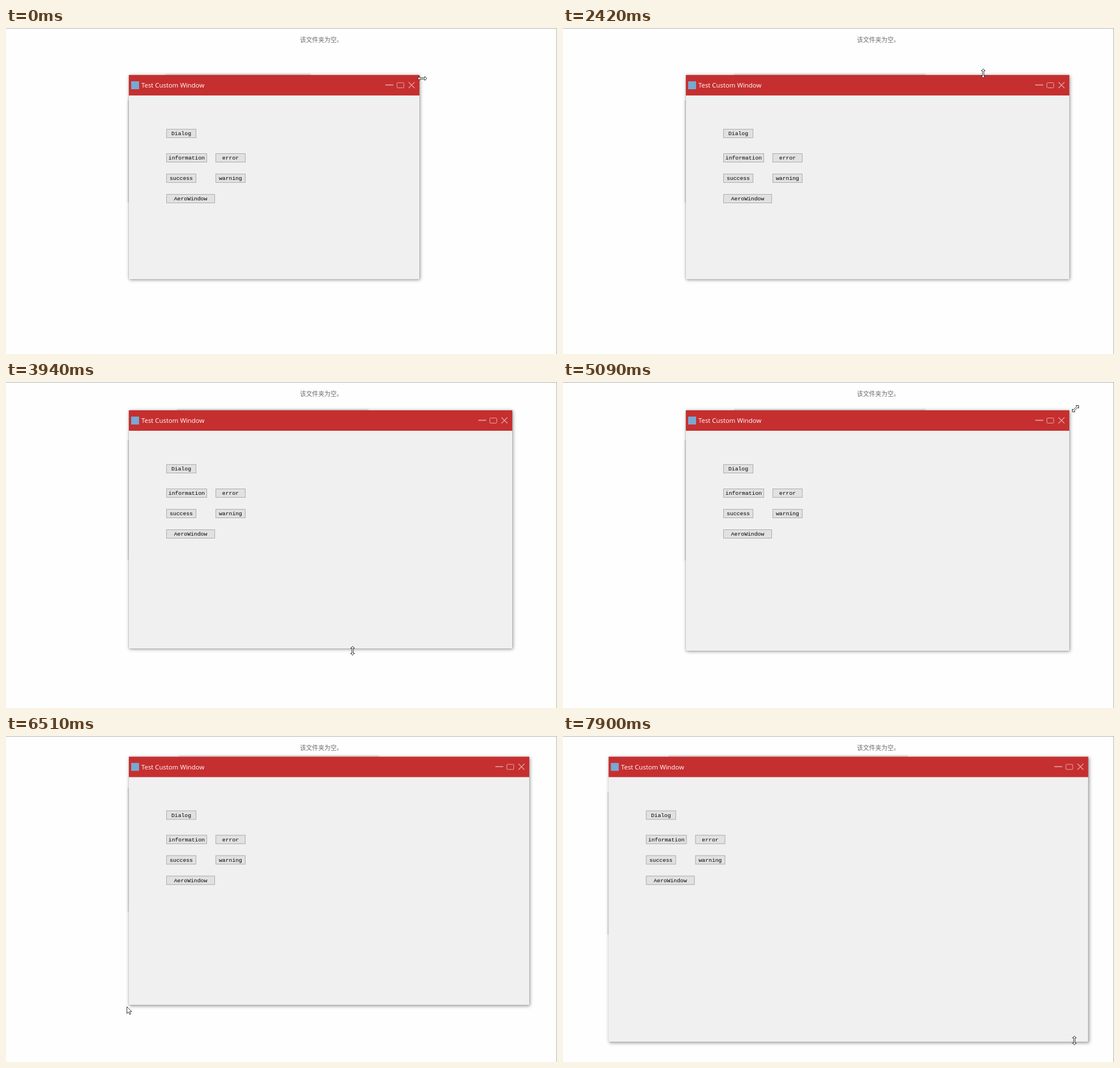
Write an HTML page that moves like this. It is 973x575 px and loops after 8 s.

```html
<!DOCTYPE html>
<html lang="zh-CN">
<head>
<meta charset="utf-8">
<title>Custom window</title>
<style>
html, body { margin: 0; width: 100%; height: 100%; overflow: hidden; background: #fefefe; }
body { position: relative; }
body * { position: absolute; box-sizing: border-box; white-space: nowrap; }
#desk { inset: 0; border: solid #b4b4b4; border-width: 1px 1px 0 0; }
#empty { left: 519px; top: 10px; font: 10.8px/20px "Noto Sans CJK SC", "Noto Sans CJK", sans-serif; color: #6d6d6d; }
#win { left: 0; top: 0; background: #f0f0f0; box-shadow: 0 0 1px #888, 1px 1px 6px rgba(0, 0, 0, .45); }
#bar { left: 0; right: 0; top: 0; height: 36px; background: #c62f2f; }
#icon { left: 4px; top: 11px; width: 14px; height: 14px; background: #78a9d2; }
#title { left: 22px; top: 0; font: 11.4px/36px "Open Sans", "Noto Sans", sans-serif; color: #fff; }
#controls { right: 0; top: 0; }
#topStrip { left: 12.5%; width: 50%; top: -4px; height: 4px; background: linear-gradient(#0000, #0002); }
#leftStrip { top: 12.5%; height: 50%; left: -4px; width: 4px; background: linear-gradient(90deg, #0000, #0002); }
.button { height: 16px; border: 1px solid #adadad; background: #e1e1e1; color: #000; text-align: center;
  font: 9.75px/15px "Liberation Mono", monospace; }
#pointer { left: 0; top: 0; overflow: visible; }
</style>
</head>
<body>
<div id="desk"></div>
<div id="empty">该文件夹为空。</div>
<div id="win">
  <div id="topStrip"></div>
  <div id="leftStrip"></div>
  <div id="bar">
    <div id="icon"></div>
    <div id="title">Test Custom Window</div>
    <svg id="controls" width="64" height="36" fill="none" stroke="#dfaaaa">
      <path d="M4 17.5H18" stroke-width="1.6"/>
      <rect x="24.5" y="13.5" width="12" height="9" rx="1"/>
      <path d="M45 12.5L55.5 23M55.5 12.5L45 23" stroke-width="1.2"/>
    </svg>
  </div>
  <div class="button" style="left:66px;top:95px;width:53px">Dialog</div>
  <div class="button" style="left:66px;top:138px;width:72px">information</div>
  <div class="button" style="left:153px;top:138px;width:53px">error</div>
  <div class="button" style="left:66px;top:174px;width:53px">success</div>
  <div class="button" style="left:153px;top:174px;width:53px">warning</div>
  <div class="button" style="left:66px;top:210px;width:86px">AeroWindow</div>
</div>
<svg id="pointer" width="1" height="1"><path fill="#fff" stroke="#222" stroke-width=".9"/></svg>
<script>
const LOOP = 8000;
const TICK = 140; // the screen refreshes in steps of this length
const win = document.getElementById('win');
const pointer = document.querySelector('#pointer path');

const ARROW = 'M.5 .5V12.5L3.3 9.8 5.3 14.2 7.2 13.4 5.3 9.1H9Z';
const DOUBLE = 'M-8 0L-4.5 -3.5V-1.2H4.5V-3.5L8 0 4.5 3.5V1.2H-4.5V3.5Z';
const ANGLES = { we: 0, ns: 90, ne: -45 };

// The pointer glides to each grip by `arrive`, then drags edges from `start` to `end`
const drags = [
  { arrive: 0, start: 410, end: 830, shape: 'we', grip: [735, 89], by: { right: 106 } },
  { arrive: 1520, start: 1650, end: 2000, shape: 'we', grip: [838, 165], by: { right: 58 } },
  { arrive: 2420, start: 2560, end: 2980, shape: 'ns', grip: [742, 80], by: { top: -33 } },
  { arrive: 3540, start: 3660, end: 3980, shape: 'ns', grip: [612, 447], by: { bottom: 31 } },
  { arrive: 4820, start: 5330, end: 5750, shape: 'ne', grip: [905, 47], by: { right: 30, top: -13.5 } },
  { arrive: 6590, start: 6730, end: 7150, shape: 'ne', grip: [210, 479], by: { left: -81, bottom: 29 } },
  { arrive: 7150, start: 7150, end: 7570, shape: 'ne', grip: [129, 508], by: { left: -55.5, bottom: 36, right: 3 } },
  { arrive: 7850, start: LOOP, end: LOOP, shape: 'ns', grip: [903, 537], by: {} }
];

function progress(time, start, end) {
  const elapsed = Math.floor((time - start) / TICK) * TICK;
  return end > start ? Math.min(1, Math.max(0, elapsed / (end - start))) : 1;
}

function sceneAt(time) {
  const edges = { left: 217, top: 83, right: 730, bottom: 443 };
  let x, y, shape, released = 0;
  for (const { arrive, start, end, shape: grabbing, grip, by } of drags) {
    if (time < released) break;
    const glide = progress(time, released, arrive);
    const eased = 1 - (1 - glide) ** 3;
    x = eased < 1 ? x + (grip[0] - x) * eased : grip[0];
    y = eased < 1 ? y + (grip[1] - y) * eased : grip[1];
    if (glide === 1) shape = grabbing;
    else if (glide > 0) shape = 'arrow';

    const pulled = progress(time, start, end);
    if (time >= start) {
      for (const edge in by) edges[edge] += by[edge] * pulled;
      x += (by.left || by.right || 0) * pulled;
      y += (by.top || by.bottom || 0) * pulled;
    }
    released = end;
  }
  return { edges, x, y, shape };
}

function draw() {
  const { edges, x, y, shape } = sceneAt(performance.now() % LOOP);
  const { left, top, right, bottom } = edges;
  win.style.transform = `translate(${left}px, ${top}px)`;
  win.style.width = `${right - left}px`;
  win.style.height = `${bottom - top}px`;
  pointer.setAttribute('d', shape === 'arrow' ? ARROW : DOUBLE);
  pointer.setAttribute('transform', `translate(${Math.round(x)} ${Math.round(y)}) rotate(${ANGLES[shape] || 0})`);
  requestAnimationFrame(draw);
}
draw();
</script>
</body>
</html>
```
